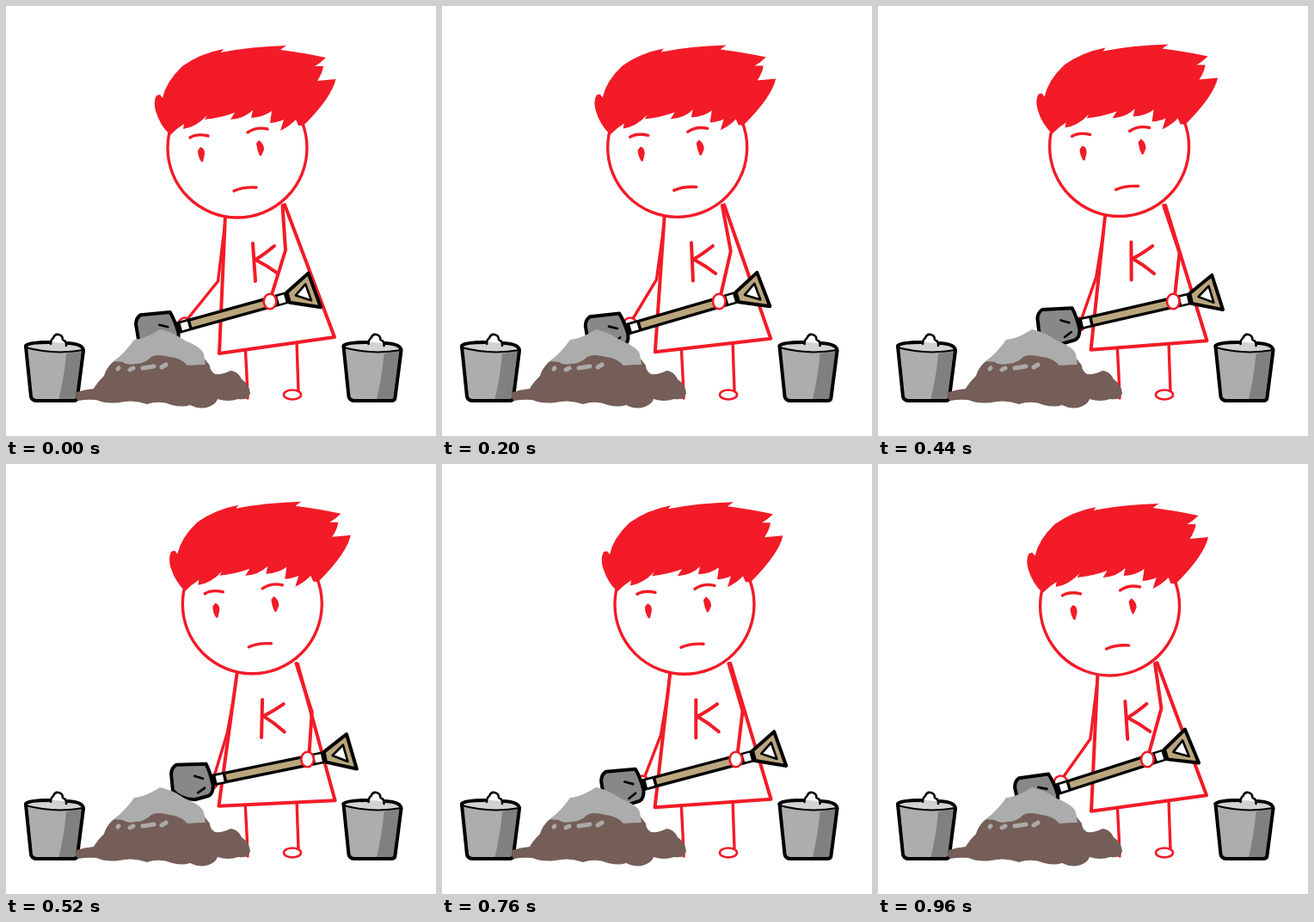
Animation, 500 px wide and 500 px high, one loop 1 s. Source, as an HTML page:

```html
<!DOCTYPE html>
<html lang="en">
<head>
<meta charset="utf-8">
<title>Digging</title>
<style>
  html, body { margin: 0; width: 100%; height: 100%; overflow: hidden; background: #fff; }
  svg { display: block; width: 100%; height: 100%; stroke-linecap: round; stroke-linejoin: round; }
  .red { stroke: #f21b27; fill: none; stroke-width: 3.4; }
  .solid { fill: #f21b27; }
  .white { fill: #fff; }
  .ink { stroke: #000; fill: none; stroke-width: 4; }
  .thin { stroke-width: 2.6; }
  .bold { stroke-width: 4; }
  .wood { fill: #baa67e; }
  .steel { fill: #888; }
  .chip { stroke: #aca9a8; fill: none; stroke-width: 5; }
</style>
</head>
<body>
<svg viewBox="0 0 500 500">
  <defs>
    <g id="bucket">
      <path fill="#adadad" d="M23 397L29 454Q30 459 36 459H78Q83 459 83 455L90 401Z"/>
      <path fill="#808080" d="M70 404L89 401L83 458L61 459Q68 430 70 404Z"/>
      <path fill="#d2d2d2" d="M23 397Q24 392 56 391Q88 393 90 400Q57 405 23 397Z"/>
      <path class="ink" d="M23 396L29 454Q30 459 36 459H78Q83 459 83 455L90 401"/>
      <path class="ink" d="M23 395Q27 391 50 391M72 392Q89 393 90 400"/>
      <path class="ink" style="stroke-width:2" d="M23 397Q56 406 90 400"/>
      <path class="ink thin" fill="#ccc" d="M52 393Q52 388 55 386Q57 381 61 382Q66 383 66 388Q71 390 70 395"/>
      <circle cx="60.5" cy="387" r="2.2" class="white"/>
    </g>
  </defs>

  <use href="#bucket"/>
  <use href="#bucket" x="369.5"/>

  <path class="red" d="M278 392L280 430L281 456M338 388L339 420L340 447"/>
  <ellipse class="red white thin" cx="333" cy="452" rx="10" ry="5.5"/>

  <path id="farArm" class="red"/>
  <circle id="farHand" class="red white thin" cy="370" r="7.5"/>

  <g id="body">
    <path class="red white bold" d="M255.5 232L248 404L382 385L324 231"/>
    <path class="red bold" d="M287 276L290 320M312 279Q300 289 290 295Q304 302 316 311"/>
  </g>
  <path id="nearArm" class="red bold"/>

  <g id="head">
    <circle class="red white" cx="269" cy="165" r="81"/>
    <path class="solid" d="M191 150Q179 139 174 122Q171 111 175 104L179 103L182 107
      Q186 88 205 70Q226 55 253 50L250 54Q285 47 326 46L319 51Q344 54 372 60
      Q366 66 359 70L369 70Q368 78 362 87L383.5 85Q379 106 346 139L340 139L337 132
      Q331 139 319 145L323 132Q317 135 307 136L309 122Q300 129 285 130L287 121
      Q277 131 261 132L266 124Q250 130 231 132L234 127Q221 141 206 143L207 137
      Q199 142 191 150Z"/>
    <path class="red" d="M214 153Q222 148 235 151M281 147Q291 140 304 143M265 215Q276 210 291 211"/>
    <path class="solid" d="M226 164Q231 165 231 172L229 181H227Q223 175 223 168ZM294 156Q300 160 300 167L297 174H295Q292 168 291 160Z"/>
  </g>

  <g id="shovel">
    <path class="ink steel" style="fill:#888" d="M-203 -26L-169 -20Q-166 -9 -166 6Q-168 16 -174 17L-190 18Q-207 14 -213 2L-211 -17Q-209 -24 -203 -26Z"/>
    <path class="ink thin" d="M-185 -9L-176 -4M-185 11L-176 7"/>
    <rect x="-166" y="-7" width="135" height="14"/>
    <rect class="wood" x="-149" y="-3.6" width="101" height="7.2"/>
    <rect class="white" x="-161" y="-4.2" width="8.5" height="8.4"/>
    <rect class="white" x="-44" y="-4.5" width="8" height="9"/>
    <path class="ink" style="fill:#baa67e" d="M-32 -6L-2 -21L1.5 21L-32 6Z"/>
    <path class="ink thin" style="fill:#fff" d="M-23 0L-8.5 -9.5L-7 10.5Z"/>
  </g>
  <ellipse id="nearHand" class="red white thin" cy="343.5" rx="7.3" ry="8.8"/>

  <path fill="#755e58" d="M82 449Q79 456 84 459Q94 457 105 458Q116 463 132 461Q148 457 164 463
    Q179 458 193 464Q206 467 214 464Q226 470 236 466Q244 463 246 457Q258 461 270 457Q282 459 284 450
    Q283 440 274 434Q269 424 261 424Q252 429 243 428Q237 424 237 418L226 404L145 405L124 414
    Q116 422 114 430Q105 439 102 445Q91 446 82 449Z"/>
  <path fill="#acacac" d="M125 413Q137 405 149 388Q162 387 179 376Q194 379 208 389Q228 397 230 405
    L232 417Q221 417 211 418Q203 409 190 408Q176 404 169 408Q161 416 151 416Q141 418 136 414Z"/>
  <path class="chip" d="M130 422L131 421M144 423L148 421M159 421L172 419M181 420L186 417"/>
</svg>
<script>
  const LOOP = 1000, STEP = 40, TURN = 600;
  const { sin, sqrt, PI } = Math;
  const $ = id => document.getElementById(id);
  const set = (id, attrs) => {
    for (const k in attrs) $(id).setAttribute(k, attrs[k]);
  };
  const line = (...pts) => "M" + pts.map(p => p.join(" ")).join("L");
  const ease = (from, to, t) => {
    const u = Math.min(1, Math.max(0, (t - from) / (to - from)));
    return u * u * (3 - 2 * u);
  };

  // pull: 0 = reaching forward, 1 = drawn back; lean and tilt follow it
  function poseAt(t) {
    if (t < TURN) {
      const u = t / TURN;
      return {
        pull: u ** 1.1,
        lean: 4.7 * ease(0, 200, t) + 15.3 * ease(300, TURN, t),
        tilt: -15.4 + 5 * u - 2.6 * sin(PI * sqrt(u))
      };
    }
    const v = (t - TURN) / (LOOP - TURN);
    return {
      pull: 1 - v ** 1.25,
      lean: 20 * (1 - ease(TURN, LOOP, t)),
      tilt: -10.4 - 7.5 * sin(PI / 2 * v)
    };
  }

  function draw(t) {
    const { pull, lean, tilt } = poseAt(t);
    const nearX = 307 + 51 * pull, farX = 208 + 36 * pull;
    set("head", { transform: `translate(${lean} ${-0.13 * lean})` });
    set("body", { transform: `rotate(${0.306 * lean} 315 395)` });
    set("shovel", { transform: `translate(${359 + 50.5 * pull} ${346.4 + 1.04 * tilt}) rotate(${tilt})` });
    set("nearHand", { cx: nearX });
    set("farHand", { cx: farX });
    set("nearArm", { d: line(
      [321.5 + 0.92 * lean, 232],
      [325 + 36 * pull, 284 + 0.25 * lean],
      [nearX + 2, 335.5]) });
    set("farArm", { d: line(
      [255 + 0.8 * lean, 250],
      [246.5 + 0.62 * lean, 320 - 0.4 * lean],
      [farX + 3, 364]) });
  }

  function tick(now) {
    draw(Math.floor((now % LOOP) / STEP) * STEP);
    requestAnimationFrame(tick);
  }
  draw(0);
  requestAnimationFrame(tick);
</script>
</body>
</html>
```
